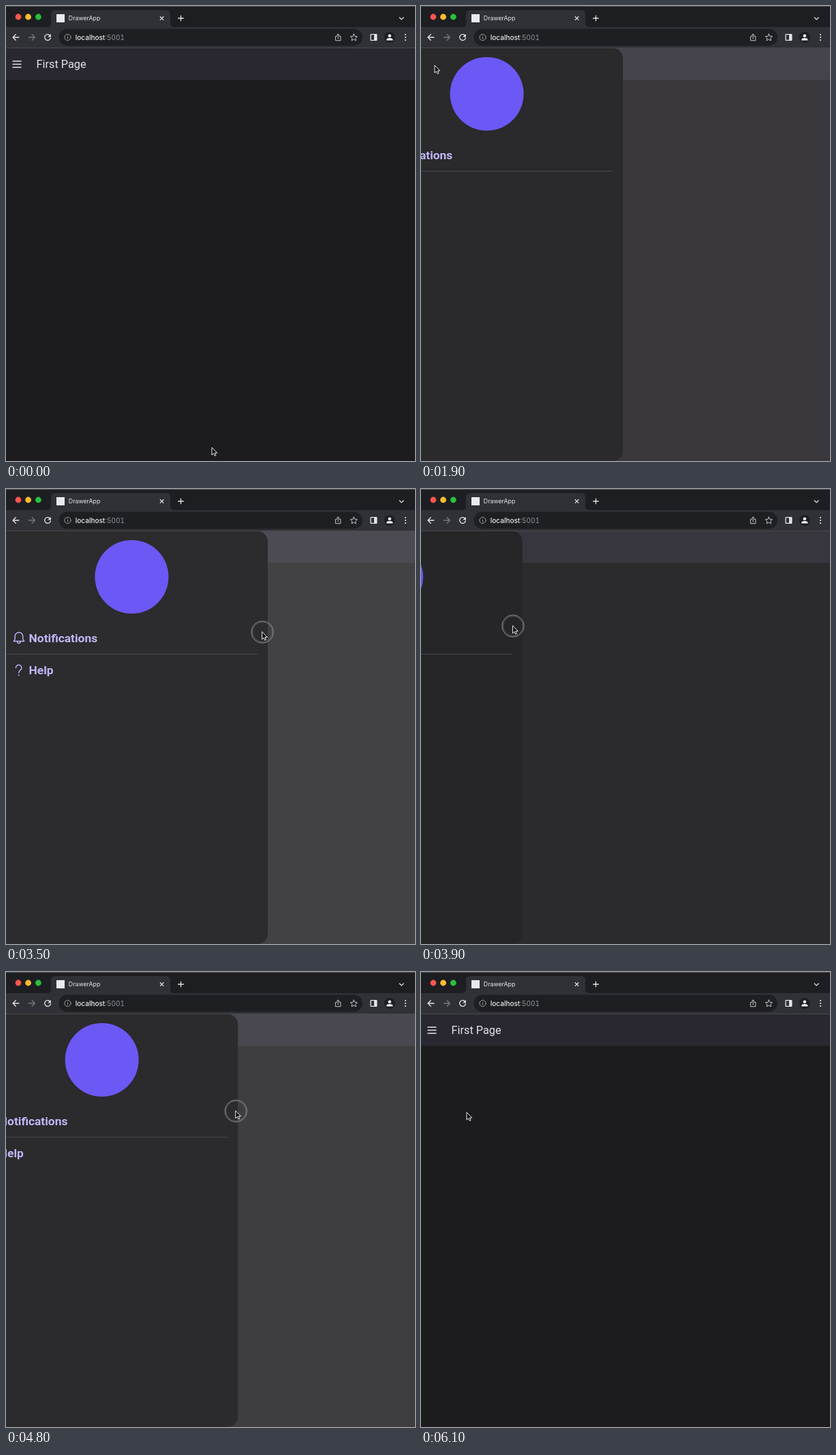
These frames come from a looping animation (600x668 px, 6.4 s). An HTML page:

```html
<!DOCTYPE html>
<html lang="en">
<head>
<meta charset="utf-8">
<title>DrawerApp</title>
<style>
  html, body { margin: 0; width: 100%; height: 100%; overflow: hidden; background: #1c1b1e; }
  svg { display: block; width: 600px; height: 668px; }
  .line { fill: none; stroke: #e2e3e7; stroke-width: 1.3; stroke-linecap: round; stroke-linejoin: round; }
  .ui { font-family: Inter, "Liberation Sans", sans-serif; font-variant-numeric: tabular-nums; }
  .app { font-family: Roboto, "Noto Sans", sans-serif; }
  .item { font-size: 17.4px; font-weight: 600; fill: #c0b6f8; }
  .icon { fill: none; stroke: #c0b6f8; stroke-width: 1.4; stroke-linecap: round; stroke-linejoin: round; }
</style>
</head>
<body>
<svg viewBox="0 0 600 668">
  <!-- page -->
  <rect width="600" height="668" fill="#1c1b1e"/>
  <rect y="62" width="600" height="46.5" fill="#292831"/>
  <path class="line" style="stroke-linecap:butt" d="M9.5 81H22.5M9.5 85.5H22.5M9.5 90H22.5"/>
  <text class="app" x="44.5" y="91" font-size="16.3" fill="#e5e1e6">First Page</text>
  <rect id="veil" y="62" width="600" height="606" fill="#e0dfe0" opacity="0"/>

  <!-- drawer, laid out at its open position -->
  <g id="drawer">
    <path id="panel" d="M-20 62H382a15 15 0 0 1 15 15V653a15 15 0 0 1 -15 15H-20Z"/>
    <circle cx="197.5" cy="129" r="54" fill="#6c58f5"/>
    <path class="icon" d="M24.3 223.5h15.5l-2-3.2v-4a5.8 5.8 0 0 0-11.6 0v4zM29.8 224a2.2 2.6 0 0 0 4.4 0"/>
    <text class="app item" x="46.6" y="224.5">Notifications</text>
    <path d="M14 242.5H382" stroke="#4b494e"/>
    <path class="icon" d="M27.5 262.5a4.2 4.2 0 1 1 6.6 3.4c-1.6 1.1-2.4 2-2.4 4.2"/>
    <circle cx="31.7" cy="273.3" r="1" fill="#c0b6f8"/>
    <text class="app item" x="46.6" y="272">Help</text>
  </g>

  <!-- browser frame -->
  <rect width="600" height="31" fill="#1d1e22"/>
  <rect width="600" height="1" fill="#505155"/>
  <rect y="31" width="600" height="31" fill="#303136"/>
  <rect y="61" width="600" height="1" fill="#48494d"/>
  <path d="M60 31q6 0 6-6V12q0-6 6-6H235q6 0 6 6V25q0 6 6 6Z" fill="#303136"/>
  <circle cx="18" cy="16" r="4.4" fill="#fe5550"/>
  <circle cx="32.6" cy="16" r="4.4" fill="#febc2e"/>
  <circle cx="47.4" cy="16" r="4.4" fill="#28c03c"/>
  <rect x="74" y="12" width="12" height="12" fill="#e9eaee"/>
  <text class="ui" x="91.8" y="21.2" font-size="8.8" fill="#e6e7ea">DrawerApp</text>
  <path class="line" d="M226.3 15.8l4.6 4.6m0-4.6l-4.6 4.6M252.7 18h7.6M256.5 14.2v7.6M577.3 17l2.9 2.9 2.9-2.9"/>
  <path class="line" d="M19 46H10.2M14.3 41.8L10.1 46l4.2 4.2"/>
  <path class="line" style="stroke:#77797e" d="M33.5 46h8.8M38.2 41.8L42.4 46l-4.2 4.2"/>
  <path class="line" d="M64.6 43.3A4.4 4.4 0 1 0 65.4 47"/>
  <path d="M65.9 41v4.6h-4.6z" fill="#e2e3e7"/>
  <rect x="77.5" y="33.5" width="445.5" height="25" rx="12.5" fill="#1e1f23"/>
  <g class="line" style="stroke:#9b9da2;stroke-width:1">
    <circle cx="90.5" cy="46" r="4.6"/>
    <path d="M90.5 45.6v2.6M90.5 43.6v.1"/>
  </g>
  <text class="ui" x="101.8" y="49.6" font-size="10" font-weight="500" fill="#eceded">localhost<tspan font-weight="400" fill="#94969b">:5001</tspan></text>
  <g class="line" style="stroke:#c3c5c9;stroke-width:1">
    <path d="M485.2 44.5H483.4V50.7H490.9V44.5H489.1M487.15 48V41.2M485 43.2l2.15-2.1 2.15 2.1"/>
    <path d="M510.3 41.1l1.5 3.3 3.6.4-2.7 2.4.8 3.6-3.2-1.8-3.2 1.8.8-3.6-2.7-2.4 3.6-.4z"/>
  </g>
  <rect x="535" y="41.7" width="8.8" height="8.6" rx=".6" class="line"/>
  <rect x="540" y="41.5" width="4" height="9" fill="#e2e3e7"/>
  <circle cx="562.8" cy="46" r="8" fill="#1e1f23"/>
  <g fill="#f2f3f5">
    <circle cx="562.8" cy="43.7" r="2.3"/>
    <path d="M558.2 50.5v-1c0-3.2 9.2-3.2 9.2 0v1z"/>
  </g>
  <path d="M586 42v8.1" stroke="#e2e3e7" stroke-width="2.2" stroke-linecap="round" stroke-dasharray="0 4"/>

  <!-- pointer -->
  <g id="pointer">
    <g id="ring" fill="none" stroke-width=".8">
      <circle cx=".5" cy=".5" r="16.2" stroke="#a8a8aa"/>
      <circle cx=".5" cy=".5" r="14.6" stroke="#6c6b6e"/>
    </g>
    <path id="arrow" fill="#101012" stroke="#fff" stroke-width=".9" stroke-linejoin="round"
      d="M0 0V11.2L2.6 8.8 4.2 12.4 6 11.6 4.4 8.1H7.8Z"/>
    <path id="hand" fill="#fff" stroke="#151517" stroke-width=".7" stroke-linejoin="round"
      d="M-.3 1.2q1-1 1.8.3l1 3.2q.8-.8 1.6 0 1-.6 1.7.3 1.2-.4 1.5.8l.4 3q0 1.5-1 2.6H2.2Q1 9.7-1 8.3q-.8-1.2.5-1.5l1.4.7z"/>
  </g>
</svg>
<script>
const LOOP = 6400, STEP = 100, OPEN = 397;

const swing = p => (1 - Math.cos(Math.PI * p)) / 2;
const easeOut = p => 1 - (1 - p) ** 2;

// Each act eases the pointer tip and the drawer's right edge towards its goal.
const first = { x: 302, y: 648, edge: 0 };
const acts = [
  { at: 50, dur: 710, goal: { x: 20, y: 87 } },
  { at: 1600, dur: 605, goal: { edge: OPEN }, ease: easeOut },
  { at: 2250, dur: 550, goal: { x: 378.5, y: 187 } },
  { at: 2800, dur: 400, goal: { x: 389, y: 210 } },
  { at: 3400, dur: 861, goal: { x: -18, y: 195, edge: 0 }, drag: true },
  { at: 4300, dur: 664, goal: { x: 396, y: 205, edge: OPEN }, drag: true },
  { at: 5200, dur: 700, goal: { x: 67, y: 206, edge: 0 }, drag: true }
];

const $ = id => document.getElementById(id);
const show = (id, on) => $(id).setAttribute("visibility", on ? "visible" : "hidden");

function poseAt(t) {
  const pose = { ...first, drag: false };
  for (const { at, dur, goal, ease = swing, drag } of acts) {
    if (t < at) break;
    const p = Math.min(1, (t - at) / dur);
    for (const key in goal) pose[key] += (goal[key] - pose[key]) * ease(p);
    pose.drag = !!drag && p < 1;
  }
  return pose;
}

function draw(t) {
  const { x, y, edge, drag } = poseAt(t);
  const part = edge / OPEN;
  const tone = 35 + Math.round(9 * part);
  const hand = t >= 800 && t < 1700;

  $("drawer").setAttribute("transform", `translate(${edge - OPEN} 0)`);
  show("drawer", edge > 0);
  $("panel").setAttribute("fill", `rgb(${tone},${tone - 1},${tone + 1})`);
  $("veil").setAttribute("opacity", 0.2 * part);

  $("pointer").setAttribute("transform", `translate(${x} ${y})`);
  show("hand", hand);
  show("arrow", !hand);
  show("ring", drag);
}

const start = performance.now();
function tick() {
  const t = (performance.now() - start) % LOOP;
  draw(Math.floor(t / STEP) * STEP);
  requestAnimationFrame(tick);
}
tick();
</script>
</body>
</html>
```
